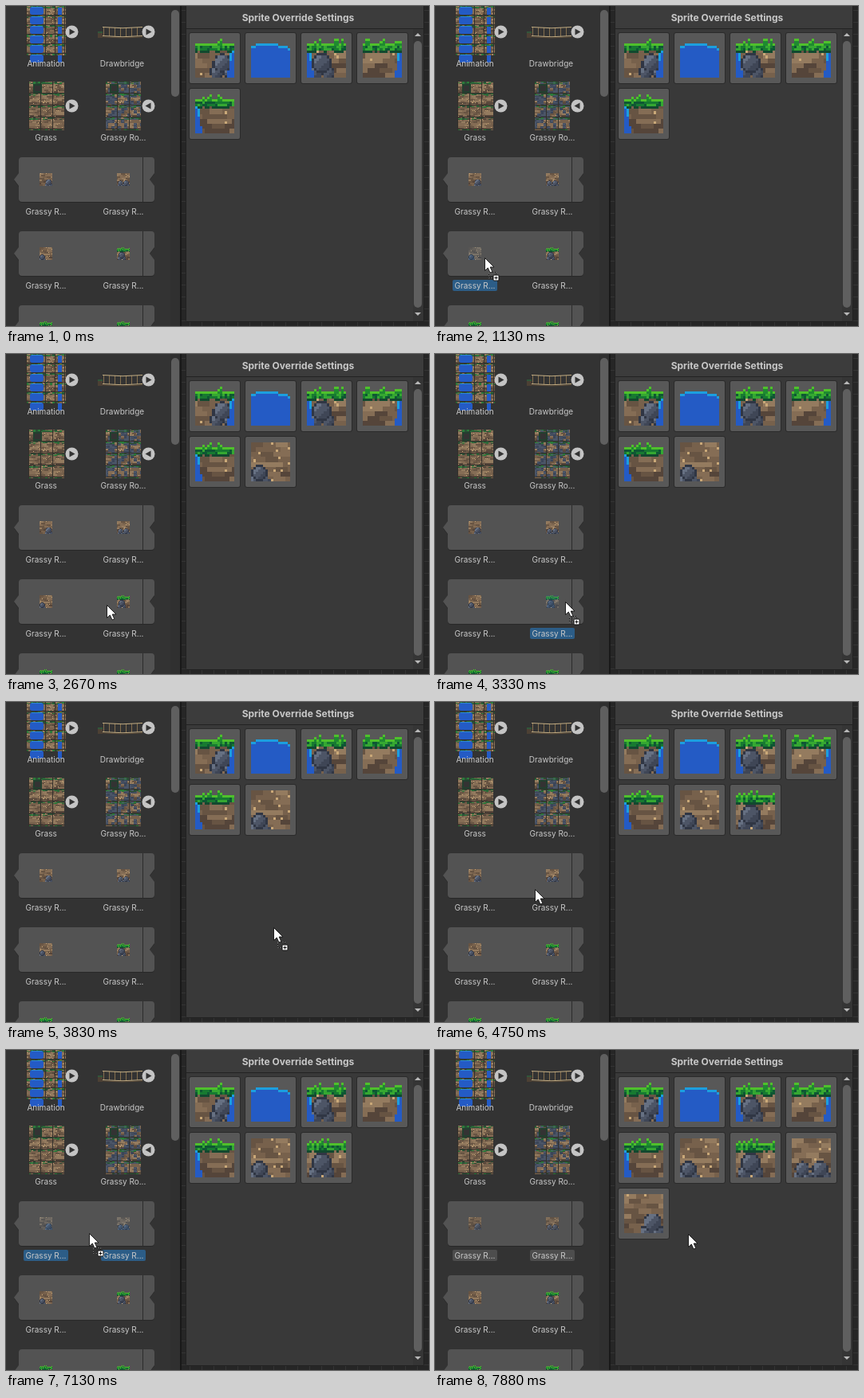
An HTML page with a canvas for the animation above (8000 ms loop, 530 by 402 pixels).

```html
<!DOCTYPE html>
<html lang="en">
<head>
<meta charset="utf-8">
<title>Sprite Override Settings</title>
<style>
html, body { margin: 0; width: 100%; height: 100%; overflow: hidden; background: #333; }
canvas, svg { position: absolute; left: 0; top: 0; width: 530px; height: 402px; }
svg { overflow: hidden; }
text { font: 10px Inter, sans-serif; fill: #c8c8c8; text-anchor: middle; }
text.title { font-size: 12px; font-weight: 700; }
</style>
</head>
<body>
<canvas id="scene" width="530" height="402"></canvas>
<svg viewBox="0 0 530 402">
  <g id="labels"></g>
  <g id="cursor">
    <g id="badge" fill="none" stroke="#111">
      <rect x="5.5" y="18.5" width="9" height="7"/>
      <rect x="5.5" y="18.5" width="9" height="7" stroke="#aaa" stroke-dasharray="1 2"/>
      <rect x="11" y="22" width="7" height="7" rx="1" fill="#fff"/>
      <path d="M12.5 25.5h4M14.5 23.5v4"/>
    </g>
    <path d="M.5 .5V16.5L4.3 13L7 19L9.8 17.8L7.2 12H12Z" fill="#fff" stroke="#111" stroke-width=".9"/>
  </g>
</svg>
<script>
// All times are in ticks of 1/24 s.
const FPS = 24, LOOP = 192;
const $ = id => document.getElementById(id);
const ctx = $('scene').getContext('2d');
ctx.imageSmoothingEnabled = false;

// ---------- sprites: 16 x 16 procedural pixel art ----------
const EARTH = ['#55453a', '#675443', '#77614c', '#856d55', '#947b5f'];
const WATER = '#245bc5', FOAM = '#1c9fde';

const hash = (x, y, seed) => {
  const v = Math.sin(x * 127.1 + y * 311.7 + seed * 74.7) * 43758.5453;
  return v - Math.floor(v);
};

// horizontal strata, lighter towards the top
function earth(x, y, seed) {
  if (hash(x, y, seed + 5) > 0.97) return '#c9a878';
  const row = Math.floor(y / 2);
  const shade = hash(Math.floor((x + row * 3) / 5), row, seed) * 4 + (y % 16 < 10 ? 1 : 0);
  return EARTH[Math.floor(shade)];
}

// one large stone resting on two smaller ones
const boulder = (x, y, r) => [[x, y, r], [x - r * 0.6, y + r, r * 0.7], [x + r * 0.7, y + r, r * 0.65]];

function rock(x, y, stones) {
  for (const [cx, cy, r] of stones) {
    const dx = (x - cx) / r, dy = (y - cy) / r, d = dx * dx + dy * dy;
    if (d > 1) continue;
    if (d > 0.75) return '#303644';
    return dx + dy < -0.5 ? '#667082' : dx + dy < 0.35 ? '#4d5566' : '#3f4656';
  }
}

// sparse bright blades over a mid and a dark band
function grass(x, y, seed) {
  const n = hash(x, y, seed);
  const blade = hash(x, 1, seed) > 0.6 ? Math.floor(hash(x, 2, seed) * 2) : 2;
  if (y < blade) return null;
  if (y < 3) return y === blade ? '#4fc02c' : '#1f8a30';
  if (y < 5) return n > 0.7 ? '#35a832' : n > 0.35 ? '#177a31' : '#0f5734';
  if (y < 6 && n > 0.4) return '#12492f';
}

function makeSprite({ seed, green, side, stones = [], pool }) {
  const c = document.createElement('canvas');
  c.width = c.height = 16;
  const g = c.getContext('2d');
  const colour = (x, y) => {
    if (pool) {
      const top = 3 - Math.round(1.2 * Math.sin(x / 4));
      return y < top ? null : y === top ? FOAM : WATER;
    }
    const leaf = green ? grass(x, y, seed) : undefined;
    if (leaf !== undefined) return leaf;
    const inset = side === 'right' ? 15 - x : side === 'left' ? x : 16;
    const width = 2 + (y > 12);
    if (y > 4 && inset < width) return y === 5 || (inset === 1 && y < 9) ? FOAM : WATER;
    return rock(x, y, stones) || earth(x, y, seed);
  };
  for (let y = 0; y < 16; y++) for (let x = 0; x < 16; x++) {
    const fill = colour(x, y);
    if (fill) { g.fillStyle = fill; g.fillRect(x, y, 1, 1); }
  }
  return c;
}

const SPRITES = [
  { green: true, side: 'right', stones: boulder(10.5, 9.5, 3.7) },
  { pool: true },
  { green: true, side: 'left', stones: boulder(5.5, 9.5, 4) },
  { green: true, side: 'right' },
  { green: true, side: 'left' },
  { stones: boulder(3, 12, 3.2) },
  { green: true, stones: boulder(5.5, 9.5, 4) },
  { stones: [...boulder(4, 12, 3), ...boulder(11, 12, 3.3)] },
  { stones: boulder(11, 11, 3.7) }
].map((spec, i) => makeSprite({ seed: i + 1, ...spec }));

// ---------- canvas helpers ----------
function rect(x, y, w, h, fill) { ctx.fillStyle = fill; ctx.fillRect(x, y, w, h); }
function round(x, y, w, h, r, fill) {
  ctx.fillStyle = fill;
  ctx.beginPath(); ctx.roundRect(x, y, w, h, r); ctx.fill();
}
function shape(d, fill) { ctx.fillStyle = fill; ctx.fill(new Path2D(d)); }
function line(d, stroke) { ctx.strokeStyle = stroke; ctx.stroke(new Path2D(d)); }
function sprite(i, x, y, size) { ctx.drawImage(SPRITES[i], x, y, size, size); }

function playButton(x, y, dir) {
  round(x - 8, y - 8, 16, 16, 8, '#c4c4c4');
  shape(`M${x - 3 * dir} ${y - 4}L${x + 4 * dir} ${y}L${x - 3 * dir} ${y + 4}Z`, '#333');
}

// rows of small earth tiles with mossy tops and dark seams
function tileSheet(left, top, w, h, size, stony) {
  for (let y = 0; y < h; y++) for (let x = 0; x < w; x++) {
    const u = x % size, v = y % size, n = hash(Math.floor(x / 3), y, stony);
    let fill = earth(x, y, 2);
    if (u === 0 || v === size - 1) fill = '#33302b';
    else if (v < 3 && n > 0.45) fill = n > 0.75 ? '#2b7a3a' : '#2a4f35';
    else if (stony && hash(Math.floor(x / 4), Math.floor(y / 4), 3) > 0.45) fill = n > 0.5 ? '#3b4558' : '#4b5567';
    rect(left + x, top + y, 1, 1, fill);
  }
}

function waterfallSheet() {
  tileSheet(25, 0, 50, 62, 12, 0);
  for (let y = 0; y < 62; y += 12) {
    round(30, y + 1, 17, 10, 3, WATER);
    rect(32, y + 1, 13, 1, '#2c86d6');
    rect(65, y + 2, 5, 9, WATER);
  }
}

function terrainSheet(left, stony) {
  tileSheet(left, 95, 45, 61, 15, stony);
  rect(left + 6, 98, 11, 11, '#22402f');
  rect(left + 8, 100, 7, 7, '#333');
}

function drawbridge() {
  rect(115, 32, 6, 8, '#4c4034');
  rect(115, 32, 6, 2, '#31563a');
  for (let x = 122; x < 171; x += 7) rect(x, 27, 1, 11, '#86704f');
  line('M121 26.5Q146 29 171 26.5', '#c4ae84');
  line('M121 37.5Q146 40 171 37.5', '#c4ae84');
  line('M121 39Q146 41 171 39', '#5a4a38');
}

function groupBox(y, icons) {
  const outline = top => `M20 ${top}H182q4 0 4 4v16l-6 8l6 8v16q0 4 -4 4H20q-4 0 -4 -4v-16l-6 -8l6 -8v-16q0 -4 4 -4Z`;
  shape(outline(y + 1), '#282828');
  shape(outline(y), '#535353');
  rect(171, y, 1, 56, '#2b2b2b');
  icons.forEach((n, i) => sprite(n, 42 + i * 97, y + 20, 16));
}

function browser() {
  rect(0, 0, 219, 402, '#333');
  rect(206, 0, 12, 402, '#303030');
  round(207, 5, 10, 109, 5, '#5f5f5f');
  waterfallSheet();
  drawbridge();
  terrainSheet(28, 0);
  terrainSheet(124, 1);
  for (const x of [82.5, 178.5]) for (const y of [32.5, 125.5]) playButton(x, y, x + y > 300 ? -1 : 1);
  [[8, 7], [5, 6], [6, 6]].forEach((icons, i) => groupBox(190 + i * 93, icons));
}

function inspector(tiles) {
  rect(218, 0, 312, 402, '#262626');
  for (let i = 5; i < 530; i += 15) {
    rect(220, i, 310, 1, '#343434');
    if (i > 220) rect(i, 390, 1, 12, '#343434');
  }
  rect(218, 0, 2, 402, '#191919');
  round(225, -4, 299, 401, 3, '#222');
  rect(226, 0, 297, 28, '#3c3c3c');
  rect(226, 29, 297, 367, '#393939');
  rect(510, 29, 13, 367, '#353535');
  round(511, 44, 10, 335, 5, '#5f5f5f');
  shape('M512 38L516 34L520 38Z', '#b8b8b8');
  shape('M512 385L516 389L520 385Z', '#b8b8b8');
  for (let i = 0; i < tiles; i++) {
    const x = 230 + i % 4 * 70, y = 34 + Math.floor(i / 4) * 70;
    round(x - 1, y - 1, 65, 65, 3, '#2b2b2b');
    round(x, y, 63, 63, 2, '#585858');
    sprite(i, x + 7, y + 7, 49);
  }
}

// ---------- labels ----------
const caption = (x, y, s, cls = '') => `<text class="${cls}" x="${x}" y="${y}">${s}</text>`;
const slotLabel = i => {
  const x = 50 + i % 2 * 97, y = 258 + (i >> 1) * 93;
  return `<g class="mark"><rect x="${x - 28}" y="${y - 7}" width="56" height="14" rx="2"/>` +
    `<rect x="${x - 8}" y="${y - 48}" width="16" height="16" opacity=".25"/></g>` + caption(x, y + 4, 'Grassy R...');
};
$('labels').innerHTML = [0, 1, 2, 3].map(slotLabel).join('') +
  caption(50, 76, 'Animation') + caption(145.5, 76, 'Drawbridge') +
  caption(50, 169, 'Grass') + caption(147, 169, 'Grassy Ro...') +
  caption(366, 19, 'Sprite Override Settings', 'title');
const marks = [...document.querySelectorAll('.mark')];

// ---------- timeline ----------
const within = (t, { from, to }) => t >= from && t < to;
const BLUR = 178;
const SELECTIONS = [
  { slot: 2, from: 22, to: 36 },
  { slot: 3, from: 76, to: 83 },
  { slot: 0, from: 119, to: 127 },
  { slot: 1, from: 127, to: LOOP },
  { slot: 0, from: 156, to: LOOP }
];
const DRAGS = [
  { from: 24, to: 49, tiles: 1 },
  { from: 78, to: 101, tiles: 1 },
  { from: 166, to: 189, tiles: 2 }
];
// pointer trips: from, to, x, y, sag of the path
const TRIPS = [
  [2, 20, 48, 298, 0], [22, 27, 62, 316, 0], [27, 45, 347, 223, 0],
  [53, 64, 126, 315, 0], [69, 76, 148, 308, 0], [77, 95, 350, 275, 25],
  [104, 119, 46, 221, 0], [120, 126, 143, 222, 0], [129, 136, 45, 228, 0],
  [136, 140, 35, 228, 0], [145, 150, 47, 228, 0], [165.5, 184, 317, 231, 3]
];

function pointer(t) {
  let x = -14, y = 410;
  for (const [from, to, endX, endY, sag] of TRIPS) {
    const u = Math.min(1, Math.max(0, (t - from) / (to - from))), s = u * u * (3 - 2 * u);
    x += (endX - x) * s;
    y += (endY - y) * s + sag * Math.sin(Math.PI * s);
  }
  return `translate(${Math.round(x)} ${Math.round(y)})`;
}

browser();
const panel = new Path2D();
panel.rect(218, 0, 312, 402);
ctx.clip(panel);

function render(t) {
  inspector(DRAGS.reduce((n, drag) => n + (t >= drag.to ? drag.tiles : 0), 5));
  marks.forEach((mark, slot) => {
    const on = SELECTIONS.some(s => s.slot === slot && within(t, s));
    mark.setAttribute('fill', !on ? 'none' : t < BLUR ? '#2c5d87' : '#4d4d4d');
  });
  $('cursor').setAttribute('transform', pointer(t));
  $('badge').style.display = DRAGS.some(drag => within(t, drag)) ? '' : 'none';
}

const start = performance.now();
let shown = -1;
function tick() {
  const t = Math.floor((performance.now() - start) / 1000 * FPS + 0.15) % LOOP;
  if (t !== shown) render(shown = t);
  requestAnimationFrame(tick);
}
tick();
</script>
</body>
</html>
```
